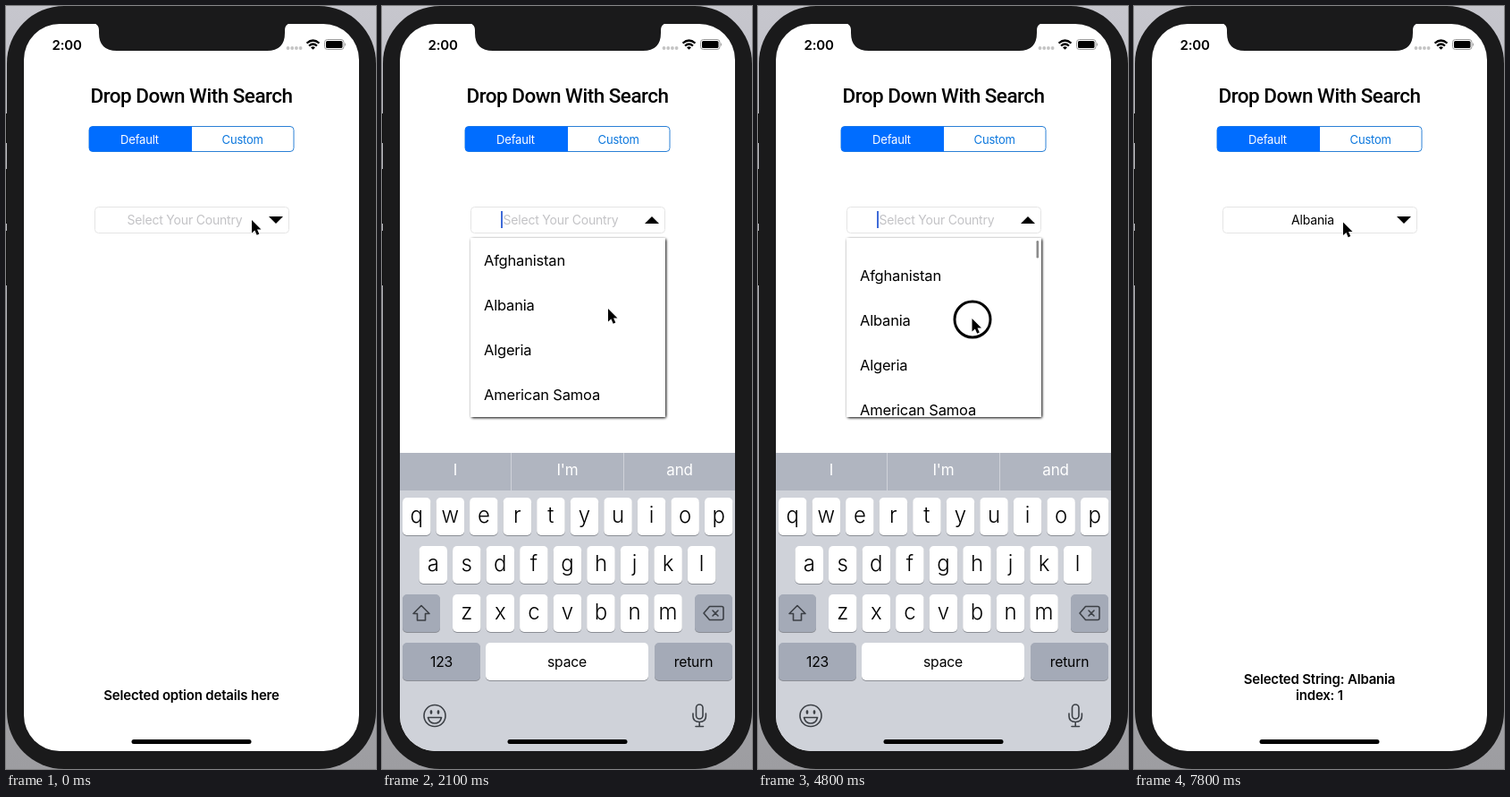
Animation of 414x852 px, one loop 8000 ms. Source, as an HTML page:

```html
<!DOCTYPE html>
<html lang="en">
<head>
<meta charset="utf-8">
<title>Drop down with search</title>
<style>
html, body { margin: 0; width: 100%; height: 100%; overflow: hidden; background: #b8b8bd; }
svg { font-family: Inter, "Liberation Sans", sans-serif; letter-spacing: -.012em; }
#stage { display: block; width: 100%; height: 100%; }
.mid { text-anchor: middle; }
.bold { font-weight: 600; font-size: 15px; }
.title { font: 500 22.5px Roboto, sans-serif; letter-spacing: -.5px; }
.row { font-size: 16.5px; }
.seg { font-size: 13px; }
.field { font-size: 14px; }
.bar { font-size: 17px; fill: #fff; }
.letter { font-size: 24px; font-weight: 300; letter-spacing: 0; }
.word { font-size: 15.7px; }
.line { fill: none; stroke: #3c4046; stroke-width: 1.6; stroke-linecap: round; stroke-linejoin: round; }
</style>
</head>
<body>
<svg id="stage" viewBox="0 0 414 852">
  <defs>
    <linearGradient id="wall" x2="0" y2="1">
      <stop stop-color="#c6c6cd"/><stop offset="1" stop-color="#9d9da1"/>
    </linearGradient>
    <clipPath id="screen"><rect x="20" y="20" width="375" height="812" rx="40"/></clipPath>
    <filter id="blur" x="-10%" y="-10%" width="120%" height="120%"><feGaussianBlur stdDeviation="1.4"/></filter>
  </defs>
  <rect width="414" height="852" fill="url(#wall)"/>
  <path d="M0 120h3v33h-3zM0 182h3v61h-3zM0 251h3v61h-3z" fill="#111"/>
  <rect x="1" width="413" height="852" rx="64" fill="#1a1a1b"/>

  <g clip-path="url(#screen)">
    <rect x="20" y="20" width="375" height="812" fill="#fff"/>
    <path d="M97 19q7 1 7 8v3q0 20 20 20h168q20 0 20-20v-3q0-7 7-8z" fill="#1a1a1b"/>

    <text x="51.5" y="48.5" class="bold">2:00</text>
    <g fill="#c4c4c4">
      <circle cx="315.500" cy="47" r="1.9"/><circle cx="320.200" cy="47" r="1.9"/>
      <circle cx="324.900" cy="47" r="1.9"/><circle cx="329.600" cy="47" r="1.9"/>
    </g>
    <g fill="none" stroke="#000" stroke-width="2.2">
      <path d="M336.500 41.500q7-6 14 0M339 44.500q4.500-4 9 0"/>
      <path d="M341 46.200q2.500-2 5 0l-2.500 2.600z" fill="#000" stroke="none"/>
    </g>
    <rect x="356.500" y="37.500" width="21.500" height="11" rx="3" fill="none" stroke="#999"/>
    <rect x="358" y="39" width="18.500" height="8" rx="1.600"/>
    <path d="M379 41q2 2 0 4z" fill="#999"/>

    <text x="207.500" y="107.500" class="mid title">Drop Down With Search</text>
    <rect x="93" y="134.500" width="229" height="28" rx="4" fill="#fff" stroke="#2b80d6"/>
    <path d="M208 134.500H97q-4 0-4 4v20q0 4 4 4h111z" fill="#006dff"/>
    <text x="149.500" y="153.500" class="mid seg" fill="#fff">Default</text>
    <text x="264.700" y="153.500" class="mid seg" fill="#0a76dd">Custom</text>

    <text id="info1" x="207.500" y="756.500" class="mid bold"></text>
    <text id="info2" x="207.500" y="774.500" class="mid bold"></text>

    <rect id="shade" x="100" width="218" rx="2" filter="url(#blur)"/>
    <svg id="table" x="99" width="218" overflow="hidden">
      <rect width="218" height="400" fill="#fff"/>
      <g id="rows">
        <rect id="cell" y="50" width="218" height="50" fill="#0ff"/>
        <rect id="cellIn" x="15" y="50" width="188" height="50" fill="#0ff"/>
      </g>
      <rect id="thumb" x="212.500" width="2.600" rx="1.300" fill="#8c8c8c"/>
    </svg>

    <rect x="99.500" y="224.500" width="217" height="29" rx="4" fill="#fff" stroke="#e4e4e4"/>
    <text id="value" x="200" y="243.500" class="mid field"></text>
    <rect id="caret" x="133" y="229" width="2" height="19" fill="#3f6bd8"/>
    <path id="arrow" d="M-8-4H8L0 4z"/>

    <g id="keyboard">
      <rect x="20" y="541" width="375" height="300" fill="#cfd2d9"/>
      <g id="bar">
        <rect x="20" y="499" width="375" height="42" fill="#b0b5c0"/>
        <path d="M144.500 499v42M270.500 499v42" stroke="#cfd2d9"/>
        <text x="82" y="524" class="mid bar">I</text>
        <text x="207.500" y="524" class="mid bar">I'm</text>
        <text x="333" y="524" class="mid bar">and</text>
      </g>
      <g id="keys"></g>
      <g class="line">
        <path d="M44 669.500l9 9h-4.500v7.500h-9v-7.500H35z"/>
        <path d="M360 678l6.500-7.500H380q2 0 2 2v11q0 2-2 2h-13.500zM370 675l6 6m0-6l-6 6"/>
        <circle cx="59" cy="792.500" r="12"/>
        <path d="M51.500 794.500h15q-1.500 6.500-7.500 6.500t-7.500-6.500z"/>
        <path d="M55 787.500v2M63 787.500v2" stroke-width="2.600"/>
        <rect x="351.500" y="780" width="7.500" height="16" rx="3.700"/>
        <path d="M348 790v3q0 6.500 7.200 6.500t7.200-6.500v-3M355.200 799.500v4.500M351 804.500h8.500"/>
      </g>
    </g>
    <rect x="140.500" y="819" width="134" height="5" rx="2.500"/>
  </g>

  <circle id="ring" r="20" fill="none" stroke="#000" stroke-width="3"/>
  <path id="pointer" d="M0 0V14.500L3.400 11.400 5.700 16.700 8.300 15.600 6 10.500H10.500z" stroke="#fff" stroke-width="1.200" paint-order="stroke"/>
</svg>
<script>
const $ = id => document.getElementById(id);
const set = (id, attrs) => { for (const k in attrs) $(id).setAttribute(k, attrs[k]); };
const add = (parent, tag, attrs, text = '') => {
  const el = document.createElementNS('http://www.w3.org/2000/svg', tag);
  for (const k in attrs) el.setAttribute(k, attrs[k]);
  el.textContent = text;
  return parent.appendChild(el);
};

const countries = ['Afghanistan', 'Albania', 'Algeria', 'American Samoa', 'Andorra', 'Angola', 'Anguilla',
  'Antarctica', 'Antigua and Barbuda', 'Argentina', 'Armenia'];
const labels = countries.map((name, i) => add($('rows'), 'text', { x: 15, y: i * 50 + 31.5, class: 'row' }, name));

function key(x, y, w, label, kind, fill = '#fff') {
  add($('keys'), 'rect', { x, y: y + 1, width: w, height: 42, rx: 5, fill: '#8b8e95' });
  add($('keys'), 'rect', { x, y, width: w, height: 42, rx: 5, fill });
  add($('keys'), 'text', { x: x + w / 2, y: y + (kind == 'word' ? 26.5 : 27.5), class: 'mid ' + kind }, label);
}
[['qwertyuiop', 23], ['asdfghjkl', 41.5], ['zxcvbnm', 79]].forEach(([letters, x], r) =>
  [...letters].forEach((c, i) => key(x + i * 37.55, 549 + r * 54, 31.5, c, 'letter')));
const grey = '#a4aab7';
key(23, 657, 42, '', 'word', grey);
key(350, 657, 42, '', 'word', grey);
key(23, 711, 87, '123', 'word', grey);
key(116, 711, 182, 'space', 'word');
key(305, 711, 87, 'return', 'word', grey);

const clamp = v => Math.min(1, Math.max(0, v));
const smooth = v => (v = clamp(v), v * v * (3 - 2 * v));
// Damped spring from 0 to 1; s in seconds
function spring(s, damping, duration) {
  if (s <= 0) return 0;
  const k = 6.93 / duration, w = k / damping * Math.sqrt(1 - damping * damping);
  return 1 - Math.exp(-k * s) * (Math.cos(w * s) + k / w * Math.sin(w * s));
}
const slide = s => s <= 0 ? 0 : 1 - (1 + 19 * s) * Math.exp(-19 * s);
// Eased value at time t along [time, value] points
function along(points, t, n = 1) {
  const i = points.findIndex(p => p[0] > t);
  if (i == 0) return points[0][n];
  if (i < 0) return points[points.length - 1][n];
  const a = points[i - 1], b = points[i];
  return a[n] + (b[n] - a[n]) * smooth((t - a[0]) / (b[0] - a[0]));
}

const OPEN = 735, PICK = 5737, FILL = 6280, END = 6850;
const pointer = [[1500, 275, 239], [2000, 253, 338], [2300, 253, 338], [2400, 252, 345], [2700, 248, 285],
  [3300, 241, 335], [3500, 241, 335], [3800, 241, 385], [4500, 240, 330], [4800, 239.5, 349], [4950, 239, 351],
  [5300, 232, 312], [5600, 211, 316], [6100, 211, 316], [6800, 265, 296], [7100, 279, 298], [7200, 279, 298],
  [7800, 234, 241.5]];
const scroll = [[2400, 0], [3300, 250.5], [3500, 250.5], [4400, 0], [4600, 0], [4800, -16.5], [4950, -18], [5300, 18.5]];
const presses = [[400, 600], [2400, 2700], [3400, 3800], [4600, 5300], [5600, 5740]];

function draw(t) {
  const picked = t >= PICK, filled = t >= FILL, done = t >= END;
  const show = done ? 0 : spring((t - OPEN) / 1000, .4, .9);
  const hide = spring((t - PICK - 400) / 1000, .9, 1);
  const alpha = clamp(show), top = 224 + 35 * show - 5 * hide;
  const left = 1 - hide;

  set('table', { y: top, height: Math.max(0, (22 + 178 * show) * left), opacity: alpha,
    visibility: alpha ? 'visible' : 'hidden' });
  set('shade', { y: top + 1, height: Math.max(0, 200 * left), opacity: alpha * clamp(left) });
  set('arrow', { transform: `translate(302 239) rotate(${180 * show * left})` });

  const offset = along(scroll, t), tint = smooth((t - PICK - 43) / 500);
  set('rows', { transform: `translate(0 ${-offset})` });
  set('cell', { opacity: tint });
  set('cellIn', { opacity: tint });
  labels[1].setAttribute('opacity', picked ? Math.sqrt(tint) : 1);
  set('thumb', { y: 3 + Math.max(0, offset) * .02, height: 36 + Math.min(0, offset),
    opacity: t < 2400 ? 0 : 1 - clamp((t - 5450) / 250) });

  const typing = t >= 700 && !picked;
  set('caret', { opacity: typing && (t - 700) % 900 < 600 ? 1 : 0 });
  set('value', { fill: filled ? '#000' : '#c3c3c6' });
  $('value').textContent = filled ? 'Albania' : 'Select Your Country';
  $('info1').textContent = picked ? 'Selected String: Albania' : '';
  $('info2').textContent = picked ? 'index: 1' : 'Selected option details here';

  const drop = picked ? 291 * slide((t - PICK) / 1000) : 333 * (1 - slide((t - OPEN + 5) / 1000));
  set('keyboard', { transform: `translate(0 ${drop})` });
  set('bar', { opacity: picked ? 0 : 1 });

  const x = along(pointer, t), y = along(pointer, t, 2);
  set('pointer', { transform: `translate(${x} ${y})` });
  set('ring', { cx: x + .5, cy: y + 1, opacity: presses.some(([a, b]) => t >= a && t < b) ? 1 : 0 });
}

function loop() {
  const t = performance.now() % 8000;
  draw(t - t % 100);
  requestAnimationFrame(loop);
}
loop();
</script>
</body>
</html>
```
